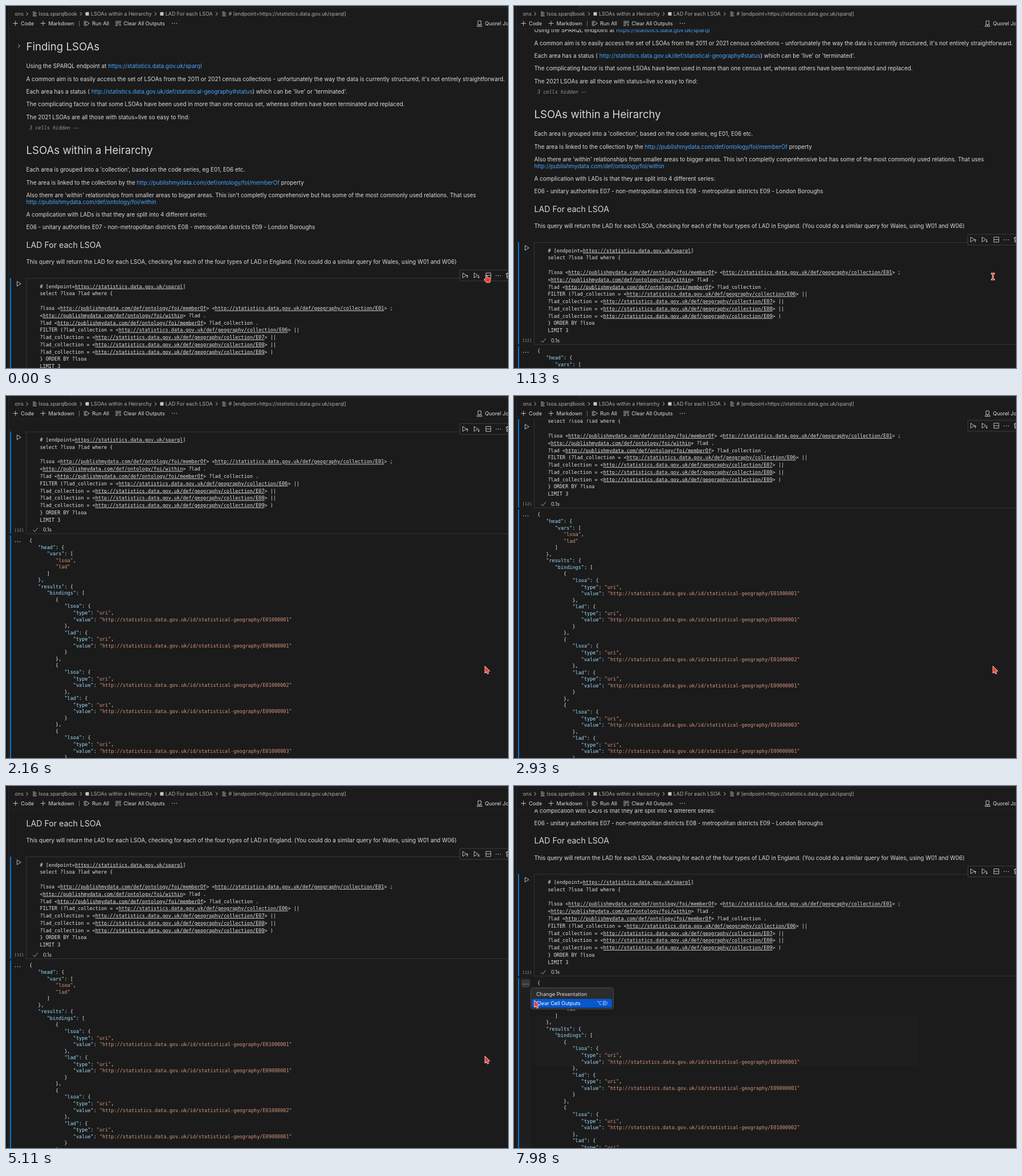
Write an HTML page that moves like this. It is 881 by 636 pixels and loops after 8 s.

```html
<!DOCTYPE html>
<html lang="en">
<head>
<meta charset="utf-8">
<title>Notebook scroll</title>
<style>
  html, body { margin: 0; width: 100%; height: 100%; overflow: hidden; background: #1b1b1b; }
  svg { display: block; }
  text { font-family: Inter, "Open Sans", sans-serif; fill: #dcdcdc; white-space: pre; }
  .mono { font-family: "DejaVu Sans Mono", "Liberation Mono", monospace; fill: #e2e2e2; }
  .crumb { fill: #adadad; }
  .head { fill: #d6d6d6; }
  .dim { fill: #989898; }
  .link { fill: #47a6ff; }
  .mono .link { fill: #e2e2e2; text-decoration: underline; text-underline-offset: 1.6px; }
  .key { fill: #9cdcfe; }
  .str { fill: #d6967c; }
  .icon { fill: none; stroke: #cfcfcf; stroke-width: .9; }
  .pointer { fill: #ee3b30; stroke: #fff; stroke-width: 1.2; stroke-linejoin: round; paint-order: stroke; }
</style>
</head>
<body>
<script>
const NS = 'http://www.w3.org/2000/svg';
const LOOP = 8000;
const MONO = 8.51;
const BODY = 9.9;
const URL_RE = /(https?:\/\/[^\s)\]>]+)/;

function el(parent, tag, attrs = {}) {
  const node = document.createElementNS(NS, tag);
  for (const k in attrs) node.setAttribute(k, attrs[k]);
  parent.append(node);
  return node;
}
const group = (parent, attrs) => el(parent, 'g', attrs);
const rect = (parent, x, y, width, height, fill, more) =>
  el(parent, 'rect', { x, y, width, height, fill, ...more });
const icon = (parent, d, more) => el(parent, 'path', { d, class: 'icon', ...more });

// parts: a string, or a list of [text, class]; cy is the middle of the line
function label(parent, x, cy, parts, size, cls = '') {
  const node = el(parent, 'text', { x, y: cy + size * .36, 'font-size': size, class: cls });
  if (typeof parts === 'string') node.textContent = parts;
  else for (const [str, c] of parts) el(node, 'tspan', { class: c }).textContent = str;
  return node;
}
const linked = s => s.split(URL_RE).map((part, i) => [part, i % 2 ? 'link' : '']);

function dots(parent, x, y, gap = 3.8, fill = '#cfcfcf') {
  for (let i = 0; i < 3; i++) el(parent, 'circle', { cx: x + i * gap, cy: y, r: .8, fill });
}
const chevron = (parent, x, y) => icon(parent, `M${x - 1.6} ${y - 3}l3.2 3-3.2 3`);
const plus = (parent, x, y) => icon(parent, `M${x - 4.3} ${y}h8.6M${x} ${y - 4.3}v8.6`);

const svg = el(document.body, 'svg', { width: 881, height: 636, viewBox: '0 0 881 636' });
const clip = el(el(svg, 'defs'), 'clipPath', { id: 'pane' });
rect(clip, 0, 40, 881, 596);

rect(svg, 0, 0, 881, 636, '#1b1b1b');
const view = group(svg, { 'clip-path': 'url(#pane)' });
const patch = rect(view, 38, 404, 672, 88, '#1e1e1e');
const strip = rect(view, 9, 337, 19.5, 299, '#1f1f20');
const moreBox = rect(view, 13, 339.5, 15.5, 14.5, '#343637', { rx: 3 });
const page = group(view);

// Markdown cells
chevron(page, 22.7, 70);
label(page, 35.5, 71.3, 'Finding LSOAs', 18.6, 'head');
label(page, 35.5, 253.3, 'LSOAs within a Heirarchy', 18.6, 'head');
label(page, 35.5, 419.5, 'LAD For each LSOA', 14.15, 'head');
[
  [105.5, 'Using the SPARQL endpoint at https://statistics.data.gov.uk/sparql'],
  [128, "A common aim is to easily access the set of LSOAs from the 2011 or 2021 census collections - unfortunately the way the data is currently structured, it's not entirely straightforward."],
  [150, "Each area has a status ( http://statistics.data.gov.uk/def/statistical-geography#status) which can be 'live' or 'terminated'."],
  [172.5, 'The complicating factor is that some LSOAs have been used in more than one census set, whereas others have been terminated and replaced.'],
  [195, 'The 2021 LSOAs are all those with status=live so easy to find:'],
  [287.5, "Each area is grouped into a 'collection', based on the code series, eg E01, E06 etc."],
  [310, 'The area is linked to the collection by the http://publishmydata.com/def/ontology/foi/memberOf property'],
  [332, "Also there are 'within' relationships from smaller areas to bigger areas. This isn't completly comprehensive but has some of the most commonly used relations. That uses"],
  [344, 'http://publishmydata.com/def/ontology/foi/within'],
  [366.5, 'A complication with LADs is that they are split into 4 different series:'],
  [388.5, 'E06 - unitary authorities E07 - non-metropolitan districts E08 - metropolitan districts E09 - London Boroughs'],
  [449.5, 'This query will return the LAD for each LSOA, checking for each of the four types of LAD in England. (You could do a similar query for Wales, using W01 and W06)']
].forEach(([y, s]) => label(page, 35.5, y, linked(s), BODY));
label(page, 41, 214, '3 cells hidden', MONO, 'mono dim').setAttribute('font-style', 'italic');
dots(page, 119.5, 214.5, 2.9, '#8f8f8f');

// Query cell
rect(page, 7, 478, 2, 179.5, '#0a78d0');
rect(page, 7, 660.5, 2, 700, '#0a78d0');
rect(page, 35.5, 478.5, 860, 179, 'none', { stroke: '#353535' });
const FOI = 'http://publishmydata.com/def/ontology/foi/';
const COLL = 'http://statistics.data.gov.uk/def/geography/collection/';
[
  '# [endpoint=https://statistics.data.gov.uk/sparql]',
  'select ?lsoa ?lad where {',
  '',
  `?lsoa <${FOI}memberOf> <${COLL}E01> ;`,
  `<${FOI}within> ?lad .`,
  `?lad <${FOI}memberOf> ?lad_collection .`,
  `FILTER (?lad_collection = <${COLL}E06> ||`,
  `?lad_collection = <${COLL}E07> ||`,
  `?lad_collection = <${COLL}E08> ||`,
  `?lad_collection = <${COLL}E09> )`,
  '} ORDER BY ?lsoa',
  'LIMIT 3'
].forEach((s, i) => label(page, 59.5, 492.6 + i * 12.77, linked(s), MONO, 'mono'));
label(page, 14.5, 650.5, '[12]', 7, 'mono dim');
icon(page, 'M47.5 651l2.8 3 5.4-7', { style: 'stroke:#89d185' });
label(page, 65, 650.5, '0.1s', 8.7);

// Output
dots(page, 16.5, 671.5, 4);
const binding = n => [
  '9{', '12"lsoa": {', '15"type": "uri",',
  `15"value": "http://statistics.data.gov.uk/id/statistical-geography/E0100000${n}"`,
  '12},', '12"lad": {', '15"type": "uri",',
  '15"value": "http://statistics.data.gov.uk/id/statistical-geography/E09000001"',
  '12}', n < 3 ? '9},' : '9}'
];
[
  '0{', '3"head": {', '6"vars": [', '9"lsoa",', '9"lad"', '6]', '3},',
  '3"results": {', '6"bindings": [',
  ...binding(1), ...binding(2), ...binding(3),
  '6]', '3}', '0}'
].forEach((s, i) => {
  const [, indent, body] = s.match(/^(\d+)(.*)$/);
  const parts = body.split(/("[^"]*":?)/).filter(Boolean).flatMap(p =>
    p.endsWith('":') ? [[p.slice(0, -1), 'key'], [':', '']] : [[p, p[0] === '"' ? 'str' : '']]);
  label(page, 41 + indent * 5.12, 669.4 + i * 11.55, parts, MONO, 'mono');
});

// Parts that stick to the top of the pane
const run = group(view);
icon(run, 'M-2.6-4.2l6.8 4.2-6.8 4.2z');
const tools = group(view);
rect(tools, 796.5, -9.5, 100, 19, '#1b1b1b', { stroke: '#3c3c3c' });
const splitBox = rect(tools, 839, -7.5, 15, 15, '#363839', { rx: 3 });
icon(tools, 'M801.5-4.5l6.6 4.3-6.6 4.3zM809.5 4.5v-5m-1.8 1.8l1.8-1.8 1.8 1.8');
icon(tools, 'M821.5-4.5l6.6 4.3-6.6 4.3zM829.5-.5v5m-1.8-1.8l1.8 1.8 1.8-1.8');
icon(tools, 'M842.2-4.5h8.6v8.8h-8.6zM842.2-.1h8.6');
dots(tools, 860.3, .2);
icon(tools, 'M877-3h8M878.2-3l.7 7.5h5M880.5-1v4M879.5-3v-1.5h3');

// Breadcrumb and notebook toolbar
rect(svg, 0, 0, 4, 636, '#191919');
rect(svg, 4, 0, 1, 636, '#292929');
rect(svg, 115, 0, 766, 4.5, '#202020');
rect(svg, 115, 0, 1, 4.5, '#303030');
rect(svg, 5, 40, 876, 1, '#202020');
[[15.5, 'ons'], [57.5, 'lsoa.sparqlbook'], [149, 'LSOAs within a Heirarchy'],
 [279.7, 'LAD For each LSOA'], [390.5, '# [endpoint=https://statistics.data.gov.uk/sparql]']
].forEach(([x, s]) => label(svg, x, 13.8, s, 8.95, 'crumb'));
[37, 131.5, 262.5, 369.7].forEach(x => chevron(svg, x, 13.8));
[47, 379.5].forEach(x => icon(svg, `M${x} 10.4h4.5M${x} 12.7h7M${x} 15h5.5M${x} 17.3h7`));
[139.5, 270.5].forEach(x => rect(svg, x, 10.8, 6, 6, '#c5c5c5'));

plus(svg, 16.7, 30.5);
plus(svg, 65, 30.5);
rect(svg, 128, 26, 1, 10, '#6a6a6a');
icon(svg, 'M137.5 26.4v8.4M139.8 26.4l6.6 4.2-6.6 4.2z');
icon(svg, 'M192 27h10M192 29.5h10M192 32h5.5M192 34.5h4M198.8 31.8l3 3m0-3l-3 3');
[[26, 'Code'], [74.5, 'Markdown'], [151, 'Run All'], [206.3, 'Clear All Outputs'], [840.5, 'Quorel Jotbench']]
  .forEach(([x, s]) => label(svg, x, 30.8, s, 9.1));
dots(svg, 291.8, 30.5);
icon(svg, 'M828.3 26h5.4v6.5h-5.4zM828.3 32.5l-1.8 3.3h9l-1.8-3.3M829.5 34.2h3');

// Output menu
const menu = group(svg);
rect(menu, 29.5, 354.5, 145, 37.5, '#2c2c2d', { rx: 4, stroke: '#4a4a4a' });
const bar = rect(menu, 31.5, 374, 140.5, 15.5, '#0558d0', { rx: 3 });
label(menu, 39, 366, 'Change Presentation', 9.05);
label(menu, 39, 381.6, 'Clear Cell Outputs', 9.05).style.fill = '#fff';
icon(menu, 'M146 378.6h2.3l2.8 5.4h2.4M150.4 378.6h3.1M156.5 378.3h4.6l3.2 3.1-3.2 3.1h-4.6zM158.2 380l2.7 2.8m0-2.8l-2.7 2.8',
  { style: 'stroke:#e8e8e8;stroke-width:.8' });

// Pointer shapes
const pointers = {
  arrow: 'M0 0V11.6L2.7 9.1 4.6 13.1 6.5 12.3 4.7 8.4H8.3Z',
  beam: 'M-2.8-5.6H2.8V-4.2H.8V4.8H2.8V6.2H-2.8V4.8H-.8V-4.2H-2.8Z',
  hand: 'M3.2 7V1.4a1.2 1.2 0 0 1 2.4 0V4.6a1.1 1.1 0 0 1 2 .2 1.1 1.1 0 0 1 1.8.3 1 1 0 0 1 1.6.8V9c0 2-1 2.4-1.2 3.6H4.4C4 11.2 1.5 9.5.6 8 .2 7 1.6 6.2 3.2 7Z'
};
const pointer = el(svg, 'path', { class: 'pointer' });

// Step tables: each row holds from its time on
const scrolls = [
  [0, 0], [440, 7], [620, 25], [800, 45], [1130, 63], [1280, 88], [1580, 140],
  [1730, 235], [1940, 345], [2160, 415.5], [2370, 434], [2610, 448], [2790, 456],
  [2930, 461], [4610, 440], [4910, 390], [5110, 354], [5560, 340], [5730, 328], [5900, 323.5]
];
const moves = [
  [0, 'hand', 839, 473], [440, 'beam', 840.5, 475], [1730, 'arrow', 840.5, 475],
  [5900, 'arrow', 701, 478], [6060, 'arrow', 40, 405], [6360, 'hand', 3, 371],
  [6510, 'hand', 6, 365], [6650, 'hand', 9, 357], [6800, 'hand', 13, 349],
  [6950, 'hand', 15, 346], [7380, 'arrow', 28, 359], [7530, 'arrow', 31, 363],
  [7680, 'arrow', 34, 368], [7830, 'arrow', 36, 375], [7980, 'arrow', 36, 377]
];
const at = (table, t) => table.findLast(row => row[0] <= t);
const show = (node, on) => node.setAttribute('visibility', on ? 'visible' : 'hidden');
const place = (node, x, y) => node.setAttribute('transform', `translate(${x} ${y})`);

function draw(t) {
  const scroll = at(scrolls, t)[1];
  place(page, 0, -scroll);
  place(run, 22, Math.max(488 - scroll, 54));
  place(tools, 0, Math.max(473.5 - scroll, 52.3));

  const [, shape, x, y] = at(moves, t);
  pointer.setAttribute('d', pointers[shape]);
  place(pointer, x, y);

  show(splitBox, t >= 140 && t < 440);
  show(patch, t >= 6060);
  show(strip, t >= 6360);
  show(moreBox, t >= 6800);
  show(menu, t >= 7240);
  show(bar, t >= 7530);
  bar.setAttribute('y', t < 7830 ? 358.5 : 374);
}

const start = performance.now();
function tick() {
  draw((performance.now() - start) % LOOP);
  requestAnimationFrame(tick);
}
tick();
</script>
</body>
</html>
```
